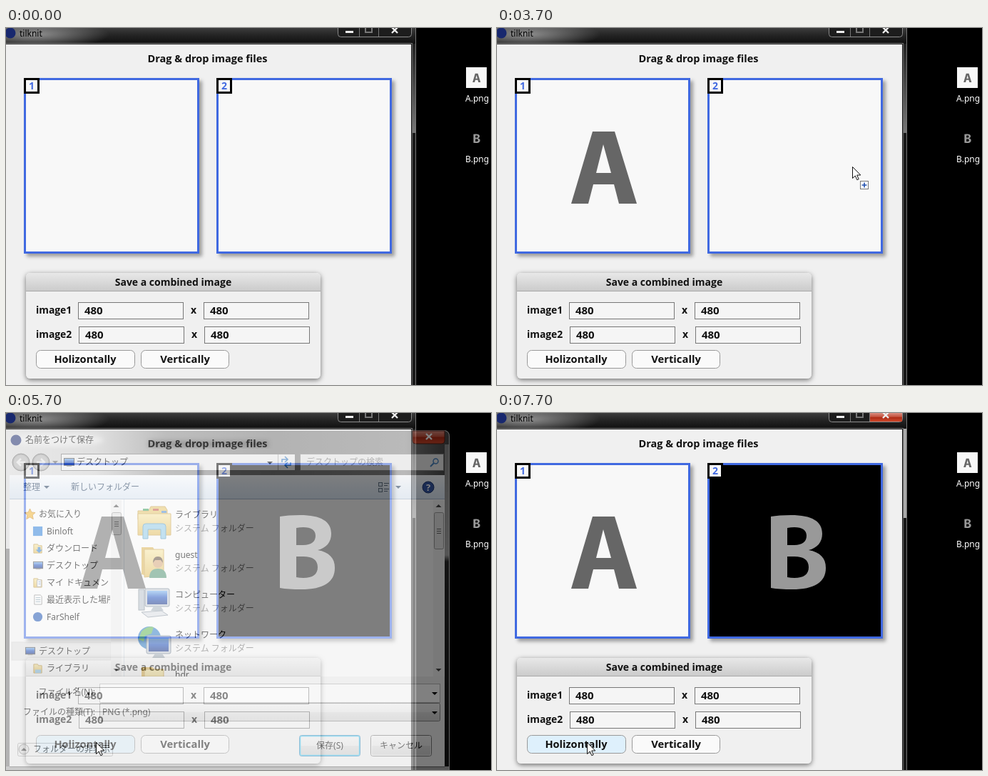
These frames come from a looping animation (680x500 px, 8 s). An HTML page:

```html
<!DOCTYPE html>
<html lang="ja">
<head>
<meta charset="utf-8">
<style>
  html, body { margin: 0; width: 100%; height: 100%; overflow: hidden; background: #000; }
  svg { display: block; width: 680px; height: 500px; }
  text { font: 12px "Noto Sans", "Noto Sans CJK JP", sans-serif; white-space: pre; }
  .bold { font: bold 14.5px "Open Sans", "Noto Sans", sans-serif; }
  .mid { text-anchor: middle; }
  .end { text-anchor: end; }
</style>
</head>
<body>
<svg id="stage" viewBox="0 0 680 500"></svg>
<script>
const LOOP = 8000, STEP = 100;
const FILE_NAME = "output";
const KEY_TIMES = [6400, 6500, 6700, 6900, 7000, 7400];

// Pointer path: time, x, y
const POINTER = [
  [800, 668, 70], [1300, 650, 74], [1400, 650, 74], [1500, 625, 91], [1700, 401, 140],
  [1900, 215, 192], [2000, 160, 222], [2300, 160, 222], [2400, 156, 221],
  [2700, 647, 159], [3200, 650, 160], [3300, 636, 164], [4000, 395, 216],
  [4400, 395, 216], [4500, 394, 222], [5100, 126, 461]
];

const rect = (x, y, w, h, fill, more = "") =>
  `<rect x="${x}" y="${y}" width="${w}" height="${h}" fill="${fill}" ${more}/>`;
const box = (x, y, w, h, fill, line, r = 0, more = "") =>
  rect(x + .5, y + .5, w - 1, h - 1, fill, `stroke="${line}" rx="${r}" ${more}`);
const circle = (x, y, r, fill, more = "") =>
  `<circle cx="${x}" cy="${y}" r="${r}" fill="${fill}" ${more}/>`;
const path = (d, fill, more = "") => `<path d="${d}" fill="${fill}" ${more}/>`;
const stroke = (d, color, width = 1) =>
  path(d, "none", `stroke="${color}" stroke-width="${width}"`);
const text = (x, y, string, fill = "#000", more = "") =>
  `<text x="${x}" y="${y}" fill="${fill}" ${more}>${string}</text>`;
const bold = (x, y, string, size = 14.5, more = 'class="bold"') =>
  text(x, y, string, "#111", `${more} style="font-size:${size}px"`);
const group = (id, content, more = "") => `<g id="${id}" ${more}>${content}</g>`;
const at = (x, y, content, scale = 1) =>
  `<g transform="translate(${x} ${y}) scale(${scale})">${content}</g>`;
const gradient = (id, stops, horizontal) =>
  `<linearGradient id="${id}" x2="${horizontal ? 1 : 0}" y2="${horizontal ? 0 : 1}">` +
  stops.map(([offset, color]) => `<stop offset="${offset}" stop-color="${color}"/>`).join("") +
  "</linearGradient>";
const down = (x, y, color = "#000") => path(`M${x - 4} ${y - 2}h8l-4 4z`, color);
const up = (x, y) => path(`M${x - 4} ${y + 2}h8l-4-4z`, "#444");

// Letters drawn inside a 240 px square picture
const letterA = path("M106 72H137L168 173H143L136 146H107L100 173H76ZM121 90L111 130H132Z",
  "#666", 'fill-rule="evenodd"');
const letterB = path("M86 72Q97 70 114 70C144 70 158 79 158 96C158 108 151 116 139 119" +
  "C155 122 163 130 163 144C163 164 147 174 116 174Q98 174 86 172Z" +
  "M109 88V112H119C130 112 136 107 136 99C136 91 130 87 119 87Q114 87 109 88Z" +
  "M109 128V157Q114 158 119 158C132 158 139 153 139 143C139 133 132 128 119 128Z",
  "#999", 'fill-rule="evenodd"');

const defs = `<defs>
  ${gradient("bar", [[0, "#3c3c3c"], [.5, "#222"], [1, "#101010"]])}
  ${gradient("side", [[0, "#222"], [1, "#777"]])}
  ${gradient("red", [[0, "#d98d80"], [.45, "#c4513c"], [.5, "#ab2a14"], [1, "#d0492c"]])}
  ${gradient("head", [[0, "#e8e8e8"], [1, "#cacaca"]])}
  ${gradient("hover", [[0, "#3c4148"], [1, "#767b82"]])}
  ${gradient("glass", [[0, "#e4e4e4"], [.2, "#d2d2d2"], [.36, "#8c8c8c"], [.6, "#777"], [.9, "#858585"], [1, "#444"]], true)}
  ${gradient("edge", [[0, "#888"], [.34, "#aaa"], [.36, "#2a2a2a"], [1, "#151515"]])}
  ${gradient("tools", [[0, "#fafcff"], [.5, "#e9f1fa"], [1, "#dbe7f4"]])}
  ${gradient("button", [[0, "#f4f4f4"], [.5, "#ebebeb"], [.52, "#dddddd"], [1, "#d0d0d0"]])}
  ${gradient("screen", [[0, "#78b4f4"], [.5, "#1c50c0"], [1, "#0c2a84"]])}
  ${gradient("manila", [[0, "#fbeaa4"], [1, "#e5bd58"]])}
  <radialGradient id="glow"><stop stop-color="#aaa" stop-opacity=".8"/><stop offset="1" stop-color="#aaa" stop-opacity="0"/></radialGradient>
  <filter id="drop" x="-10%" y="-10%" width="125%" height="125%"><feDropShadow dx="4" dy="4" stdDeviation="2.5" flood-opacity=".35"/></filter>
  <filter id="soft" x="-10%" y="-10%" width="120%" height="125%"><feDropShadow dx="0" dy="2" stdDeviation="3.5" flood-opacity=".55"/></filter>
  <filter id="blur"><feGaussianBlur stdDeviation="3"/></filter>
  <clipPath id="nav"><path d="M6 121h140v248H6z"/></clipPath>
</defs>`;

const desktopFile = (id, y, name, fill, letter) =>
  group(id, box(607, y - 2, 80, 57, "url(#hover)", "#7e9cc0", 3)) +
  rect(645, y, 29, 29, fill) + at(645, y, letter, .121) + text(644, y + 48, name, "#fff");

const dropZone = (x, number, id, fill, letter) =>
  rect(x, 70, 246, 246, "#4169e1", 'filter="url(#drop)"') +
  rect(x + 3, 73, 240, 240, "#f8f8f8") +
  group(id, rect(x + 3, 73, 240, 240, fill) + at(x + 3, 73, letter)) +
  rect(x, 70, 22, 22, "#000") + rect(x + 3, 73, 16, 16, "#f8f8f8") +
  text(x + 11, 86, number, "#4169e1", 'class="bold mid" style="font-size:14px"');

const sizeRow = (x, y, label) =>
  bold(42, y + 16, label, 13.9) + bold(x + 158, y + 16, "x", 14) +
  [x, x + 176].map(left => box(left, y, 148, 24, "#f5f5f5", "#777") +
    bold(left + 9, y + 17, "480", 15)).join("");

const mainWindow =
  rect(0, 0, 575, 500, "#181818") + rect(0, 0, 575, 22, "url(#bar)") +
  `<ellipse cx="40" cy="9" rx="105" ry="20" fill="url(#glow)"/>` +
  circle(6, 7, 7.5, "#18286e") + text(19, 12, "tilknit") +
  rect(569, 22, 5, 125, "url(#side)") + rect(574, 0, 1, 500, "#777") +
  rect(0, 21, 570, 1, "#777") + rect(569, 22, 1, 478, "#666") +
  box(465, -6, 104, 19, "#1d1d1d", "#8a8a8a", 4) +
  group("activeClose", rect(523, 0, 45, 12, "url(#red)") + rect(570, 22, 4, 125, "#aaa")) +
  stroke("M495.5 0V12M522.5 0V12", "#777") +
  rect(476, 4, 11, 3, "#eee") + stroke("M504 0V6H513V0", "#777", 2) +
  stroke("M541 -1L549 7M549 -1L541 7", "#eee", 2.4) +
  rect(0, 23, 568, 477, "#f0f0f0") +
  bold(282.5, 48, "Drag &amp; drop image files", 14.5, 'class="bold mid"') +
  dropZone(25, 1, "pictureA", "#f8f8f8", letterA) +
  dropZone(295, 2, "pictureB", "#000", letterB) +
  rect(28, 343, 413, 148, "#f0f0f0", 'rx="6" filter="url(#soft)"') +
  path("M28 369V349Q28 343 34 343H435Q441 343 441 349V369Z", "url(#head)") +
  rect(28, 368, 413, 1, "#aaa") +
  bold(234.5, 361, "Save a combined image", 14, 'class="bold mid"') +
  sizeRow(101, 384, "image1") + sizeRow(102, 418, "image2") +
  box(42, 451, 139, 26, "#fafafa", "#999", 6, 'id="joinButton"') +
  box(189, 451, 124, 26, "#fafafa", "#999", 6) +
  bold(111, 469, "Holizontally", 14.6, 'class="bold mid"') +
  bold(251, 469, "Vertically", 14.8, 'class="bold mid"');

// Small icons are drawn in a 16 px square, large ones in a 48 px square
const monitor = rect(1, 2, 15, 11, "#444") + rect(2, 3, 13, 9, "url(#screen)") + rect(5, 13, 7, 1, "#888");
const folder = path("M2 2h6l1 2h5v11H2z", "url(#manila)", 'stroke="#c09a42"');
const sheet = path("M3 1h9l2 2v12H3z", "#fff", 'stroke="#888"') + stroke("M5 5h7M5 8h7M5 11h7", "#79a");
const smallIcons = {
  star: path("M8 0l2.4 5.3 5.6.6-4.2 3.8 1.2 5.8L8 12.6l-5 2.9 1.2-5.8L0 5.900l5.600-.6z", "#f5b52e", 'stroke="#d08a18"'),
  square: rect(1, 1, 14, 14, "#2a80dd"),
  disc: circle(8, 8, 7, "#1650b4"),
  monitor, sheet,
  download: folder + path("M8 6h4v4h3l-5 5-5-5h3z", "#2c7ed0"),
  documents: folder + rect(7, 4, 6, 10, "#fff", 'stroke="#999"') + stroke("M9 7h3M9 10h3", "#58c"),
  library: folder + rect(4, 10, 9, 5, "#8ac4e8")
};
const bigFolder = path("M6 3h16l3 5v38l-19-5z", "#dfb551") +
  path("M10 6h27v36l-27 3z", "url(#manila)", 'stroke="#cda44c"');
const bigMonitor = (x, y) => rect(x, y, 34, 25, "#c9d2dc", 'rx="2" stroke="#768595"') +
  rect(x + 3, y + 3, 28, 19, "url(#screen)") + path(`M${x + 12} ${y + 25}h10l4 6h-18z`, "#aab5c0");
const bigIcons = {
  library: path("M1 8h15l3-6h20l3 5v13H1z", "#e9c868", 'stroke="#c9a248"') +
    rect(8, 5, 8, 3, "#3ca05a") + rect(22, 5, 8, 3, "#c85040") + rect(34, 8, 7, 3, "#4a8ad0") +
    path("M1 12h46v30H1z", "url(#manila)", 'stroke="#cda44c"') +
    path("M8 47V30q0-4 4-4h24q4 0 4 4v17h-7V34H15v13z", "#8fcbea", 'stroke="#539bc4"'),
  person: bigFolder + circle(29, 25, 7, "#d9a878") + path("M22 25q0-9 7-9t7 9l-3-4h-8z", "#5c4632") +
    path("M17 46q0-13 12-13t12 13z", "#4c9270"),
  computer: rect(2, 6, 8, 29, "#bcc6d0", 'stroke="#7f8b98"') + bigMonitor(11, 5) + path("M6 38l28-2 9 6-28 3z", "#dde2e8", 'stroke="#8d99a6"'),
  network: circle(17, 18, 16, "#2c7cc8") + path("M6 9q9-9 17-6l-3 9-9 3-2 8-7-3zM20 20l11 2-7 10-6-4z", "#5fb852") + bigMonitor(13, 15),
  folder: bigFolder
};

const navItem = (x, y, icon, name) =>
  at(x, y - 8, smallIcons[icon], .94) + text(x + 20, y + 4, name);
const fileItem = (row, icon, name) => {
  const y = 147 + row * 56;
  return at(184, y - 18, bigIcons[icon]) + text(237, y, name) + text(237, y + 19, "システム フォルダー", "#777");
};
const scrollbar = (x, thumb) =>
  rect(x, 122, 15, 247, "#f1f1f1") + up(x + 7.5, 130) + down(x + 7.5, 360, "#444") +
  box(x + 1, 139, 14, thumb, "#e3e3e3", "#999", 2) +
  stroke([-3, 0, 3].map(dy => `M${x + 5} ${139.5 + Math.floor(thumb / 2) + dy}h6`).join(""), "#666");
const navButton = x => circle(x, 69, 12, "#a5a5a5", 'stroke="#666"') + circle(x, 69, 10, "#bcbcbc");
const pushButton = (x, label, line) =>
  box(x, 451, 86, 30, "url(#button)", line, 3) + box(x + 1, 452, 84, 28, "none", "#f8f8f8", 2) +
  text(x + 43, 470, label, "#000", 'class="mid"');

const dialog =
  path("M0 24H614Q622 24 622 32V500H0Z", "url(#glass)") +
  rect(615, 44, 6, 456, "url(#edge)") + rect(0, 190, 5, 310, "#777") +
  stroke("M0 24.500H613Q621.500 24.500 621.500 33V500", "#ccc") +
  `<g filter="url(#blur)"><ellipse cx="72" cy="38" rx="65" ry="9" fill="#fff" opacity=".6"/>
   ${rect(200, 39, 168, 9, "#333", 'opacity=".75"')}</g>` +
  circle(14, 38, 7.5, "#18286e") + text(27, 42, "名前をつけて保存") +
  path("M570 25H615V39Q615 43 611 43H574Q570 43 570 39Z", "url(#red)", 'stroke="#501c14"') +
  stroke("M589 29L597 37M597 29L589 37", "#fff", 2.4) +
  navButton(21) + navButton(49) +
  stroke("M27 69H16M21 64l-5 5 5 5M43 69h11M49 64l5 5-5 5", "#eee", 2.5) + down(69, 69, "#666") +
  box(77, 57, 329, 24, "#f3f3f3", "#777") + rect(381, 58, 1, 22, "#aaa") +
  at(80, 61, monitor) + text(99, 73, "デスクトップ") + down(370, 70) +
  group("crumb", path("M185 65.500v8l4-4z", "#000")) +
  stroke("M387 69v-4h8M391 61l4 4-4 4M399 69v4h-8M395 77l-4-4 4-4", "#2b76c4", 1.6) +
  box(412, 57, 202, 24, "#ececec", "#888") + text(421, 73, "デスクトップの検索", "#777") +
  circle(602.5, 67.5, 3.5, "none", 'stroke="#4b83bd" stroke-width="1.5"') + stroke("M600 70l-5 5", "#4b83bd", 2) +
  rect(5, 87, 610, 34, "url(#tools)") + rect(5, 120, 610, 1, "#a9bacd") +
  text(24, 108, "整理", "#1e395b") + down(57, 104, "#1e395b") + text(91, 108, "新しいフォルダー", "#1e395b") +
  [97, 105].map(y => box(522, y, 6, 6, "#dce8f4", "#678") + stroke(`M530 ${y + 1.5}h7M530 ${y + 4.5}h5`, "#678")).join("") +
  down(550, 104, "#1e395b") + circle(592, 104, 8, "#3456a4", 'stroke="#20386e"') +
  text(592, 109, "?", "#fff", 'class="mid" style="font-weight:bold;font-size:13px"') +
  rect(5, 121, 610, 248, "#fcfcfc") + rect(8, 321, 139, 25, "#e9e9e9", 'stroke="#ddd"') +
  group("navigation",
    navItem(26, 142, "star", "お気に入り") +
    [["square", "Binloft"], ["download", "ダウンロード"], ["monitor", "デスクトップ"],
     ["documents", "マイ ドキュメント"], ["sheet", "最近表示した場所"], ["disc", "FarShelf"]]
      .map(([icon, name], i) => navItem(37, 166 + 24 * i, icon, name)).join("") +
    navItem(26, 334, "monitor", "デスクトップ") + navItem(37, 358, "library", "ライブラリ"),
    'clip-path="url(#nav)"') +
  scrollbar(147, 32) + rect(165, 121, 1, 248, "#d5dfe8") +
  [["library", "ライブラリ"], ["person", "guest"], ["computer", "コンピューター"],
   ["network", "ネットワーク"], ["folder", "hdr"]].map(([icon, name], i) => fileItem(i, icon, name)).join("") +
  scrollbar(599, 52) +
  rect(5, 369, 610, 126, "#f0f0f0") + rect(0, 495, 621, 5, "#aaa") + rect(5, 495, 610, 1, "#666") +
  text(125, 395, "ファイル名(N):", "#000", 'class="end"') +
  text(125, 423, "ファイルの種類(T):", "#000", 'class="end"') +
  box(131, 379, 478, 27, "#fff", "#b5b5b5") + down(601, 393) +
  text(135, 396, "", "#000", 'id="fileName"') + rect(135, 382, 1, 18, "#000", 'id="caret"') +
  box(131, 406, 478, 26, "url(#button)", "#888", 2) + text(135, 423, "PNG (*.png)") + down(601, 420) +
  box(16, 462, 134, 19, "#eee", "#aaa", 2) + circle(25, 471, 7, "#ddd", 'stroke="#888"') + up(25, 471) +
  text(38, 475, "フォルダーの非表示") +
  pushButton(411, "保存(S)", "#3c7fb1") +
  box(412, 452, 84, 28, "none", "#45c8f0", 2, 'id="saveGlow" stroke-width="1.5"') +
  pushButton(511, "キャンセル", "#777");

const pointer = path("M.5 .5V16.500L4.300 13 6.800 18.700 9.200 17.700 6.700 12H11.800Z", "#fff", 'stroke="#111"') +
  group("badge", box(11, 20, 12, 12, "#fff", "#777") + stroke("M13.500 26h7M17 22.500v7", "#2050b0", 1.6));

const stage = document.getElementById("stage");
stage.innerHTML = defs + rect(0, 0, 680, 500, "#000") +
  desktopFile("hoverA", 55, "A.png", "#f8f8f8", letterA) +
  desktopFile("hoverB", 140, "B.png", "#000", letterB) +
  mainWindow + group("dialog", dialog) + group("pointer", pointer);

const part = id => document.getElementById(id);
const show = (id, visible) => part(id).setAttribute("visibility", visible ? "inherit" : "hidden");
const within = (t, from, to) => t >= from && t < to;

function pointerAt(t) {
  const next = POINTER.findIndex(([time]) => time > t);
  if (next < 1) return (next ? POINTER[POINTER.length - 1] : POINTER[0]).slice(1);
  const [t0, x0, y0] = POINTER[next - 1], [t1, x1, y1] = POINTER[next];
  const k = (t - t0) / (t1 - t0);
  return [Math.round(x0 + (x1 - x0) * k), Math.round(y0 + (y1 - y0) * k)];
}

function draw(t) {
  const [x, y] = pointerAt(t);
  const dragging = within(t, 1500, 2400) || within(t, 3300, 4500);
  part("pointer").setAttribute("transform", `translate(${x} ${y})`);
  show("pointer", t >= 800 && !within(t, 6700, 7700));
  show("badge", dragging && x < 568);

  show("hoverA", within(t, 800, 1500));
  show("hoverB", within(t, 2500, 3300) && x > 606);
  show("pictureA", t >= 2200);
  show("pictureB", t >= 4100);
  show("activeClose", within(t, 5500, 5600) || t >= 7700);
  part("joinButton").setAttribute("fill", t >= 5000 ? "#def0fc" : "#fafafa");

  show("dialog", within(t, 5700, 7700));
  part("dialog").setAttribute("opacity", t < 5800 ? .5 : 1);
  show("crumb", t >= 6000);
  const typed = KEY_TIMES.filter(time => t >= time).length;
  const field = part("fileName");
  field.textContent = FILE_NAME.slice(0, typed);
  part("caret").setAttribute("x", 135 + (typed ? Math.round(field.getComputedTextLength()) : 0));
  show("caret", within(t, 5800, 6200) || within(t, 6400, 7700));
  part("saveGlow").setAttribute("opacity", within(t, 6700, 7200) ? .5 : 1);
}

function tick() {
  draw(Math.floor(performance.now() % LOOP / STEP) * STEP);
  requestAnimationFrame(tick);
}
tick();
</script>
</body>
</html>
```
